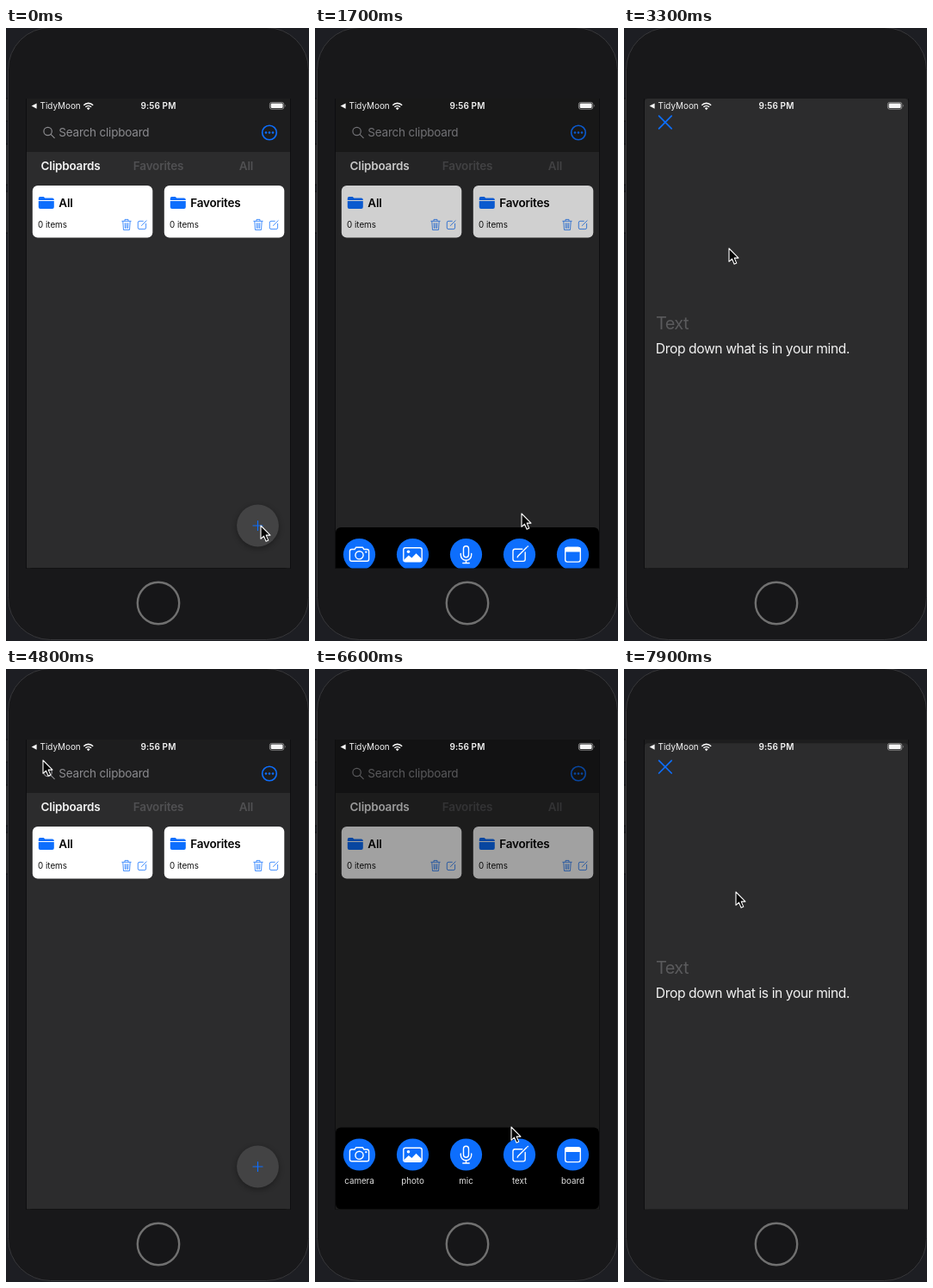
Write an HTML page that moves like this. It is 352 px wide and 712 px high and loops after 8 s.

```html
<!DOCTYPE html>
<html lang="en">
<head>
<meta charset="utf-8">
<title>Clipboard app</title>
<style>
  html, body { margin: 0; width: 100%; height: 100%; overflow: hidden; background: #1d1e23; }
  svg { display: block; width: 100%; height: 100%; }
  text { font-family: Inter, "Liberation Sans", sans-serif; font-size: 13.5px; letter-spacing: -.2px; }
  .mid { text-anchor: middle; }
  .semi { font-weight: 600; }
  .small { font-size: 9.8px; letter-spacing: -.03px; }
  .blue { stroke: #0d6efd; }
  .line { fill: none; stroke-linecap: round; stroke-linejoin: round; }
</style>
</head>
<body>
<svg viewBox="0 0 352 712">
  <defs>
    <clipPath id="screen"><rect x="24" y="82" width="306" height="545.5"/></clipPath>
    <filter id="soft" x="-50%" y="-50%" width="200%" height="200%"><feGaussianBlur stdDeviation="3"/></filter>

    <g id="card">
      <rect width="139.5" height="60.5" rx="6" fill="#fff"/>
      <path d="M7 17v-2.2q0-1.8 1.8-1.8h4l1.8 1.6h8.4q2 0 2 1.8V17z" fill="#0d6efd"/>
      <path d="M7 18h18v7q0 2-2 2H9q-2 0-2-2z" fill="#0d6efd"/>
      <g class="line blue" stroke-width=".95" opacity=".8">
        <path d="M104 41.3h10.4M107.2 41v-1.6h4V41M105 41.5l.7 10h7l.7-10M107.4 43.7l.2 5.8M109.2 43.7v5.8M111 43.7l-.2 5.8"/>
        <path d="M128.5 41.3h-4.3q-1.7 0-1.7 1.7v5.9q0 1.7 1.7 1.7h5.9q1.7 0 1.7-1.7v-4.6M126.6 46.5l5.8-5.8"/>
      </g>
      <text class="small" x="6.3" y="49" fill="#111">0 items</text>
    </g>

    <g id="camera">
      <path d="M-8.8-6h3.4l1.6-2.3h7.6L5.4-6h3.4q2.3 0 2.3 2.3v9.2q0 2.3-2.3 2.3H-8.8q-2.3 0-2.3-2.3v-9.2q0-2.3 2.3-2.3z"/>
      <circle cy=".8" r="4.6"/><circle cx="7.8" cy="-2.9" r=".5"/>
    </g>
    <g id="photo">
      <rect x="-10.7" y="-7.8" width="21.4" height="16" rx="2.3"/>
      <path d="M-10 6l5.3-5 3.6 3.1L4-1.2 10 4.8v1.5q0 1.4-1.6 1.4H-8.4Q-10 7.7-10 6z" fill="#fff" stroke="none"/>
      <circle cx="-5" cy="-3.2" r="1.8" fill="#fff" stroke="none"/>
    </g>
    <g id="mic">
      <rect x="-3" y="-9.8" width="6" height="13" rx="3"/>
      <path d="M-6.2-1v1.6a6.2 6.2 0 0 0 12.4 0V-1M0 7v3M-3.7 10h7.4"/>
    </g>
    <g id="text">
      <path d="M3.2-6.3h-8.4q-2.3 0-2.3 2.3v9.6q0 2.3 2.3 2.3h9.6q2.3 0 2.3-2.3v-8.2M-1.8 2.1L8.4-8.2M-1.8 2.1l-.5 1.2"/>
      <path d="M9.5-9.3l.3-.3"/>
    </g>
    <g id="board">
      <rect x="-8.8" y="-8" width="17.6" height="16.6" rx="2.6"/>
      <path d="M-8.6-3.7v-2Q-8.6-8-6.3-8H6.3q2.3 0 2.3 2.3v2z" fill="#fff"/>
    </g>
  </defs>

  <rect width="352" height="712" fill="#1d1e23"/>
  <g fill="#29292c" stroke="#09090a" stroke-width=".8">
    <rect x="-2" y="82" width="5" height="26"/>
    <rect x="-2" y="135" width="5" height="47"/>
    <rect x="-2" y="190" width="5" height="48"/>
  </g>
  <rect x="2.5" y="-.5" width="349" height="711" rx="49" fill="#18181a" stroke="#37373a"/>
  <rect x="23.5" y="82" width="307" height="546" fill="#050506"/>
  <circle cx="177" cy="668" r="24.2" fill="#161618" stroke="#707070" stroke-width="2.4"/>

  <g clip-path="url(#screen)">
    <rect x="24" y="82" width="306" height="546" fill="#2c2c2d"/>
    <rect x="24" y="82" width="306" height="62" fill="#1d1d1e"/>
    <g class="line" stroke="#8b8b8f" stroke-width="1.2">
      <circle cx="48.6" cy="120" r="4.7"/><path d="M52.2 123.6l4 4"/>
    </g>
    <text x="61.3" y="126.3" fill="#8b8b8f">Search clipboard</text>
    <circle class="line blue" cx="306" cy="121.5" r="8.3" stroke-width="1.6"/>
    <g fill="#0d6efd">
      <circle cx="302" cy="121.5" r="1.3"/><circle cx="306" cy="121.5" r="1.3"/><circle cx="310" cy="121.5" r="1.3"/>
    </g>
    <g class="mid semi" fill="#505052">
      <text x="75" y="165.3" fill="#f4f4f4">Clipboards</text>
      <text x="177" y="165.3">Favorites</text>
      <text x="279" y="165.3">All</text>
    </g>
    <use href="#card" x="30.8" y="183"/>
    <use href="#card" x="183.8" y="183"/>
    <g class="semi" fill="#050505">
      <text x="61.3" y="207.8">All</text>
      <text x="214.2" y="207.8">Favorites</text>
    </g>
    <g id="fab">
      <circle cx="292.5" cy="580" r="25" fill="#000" opacity=".3" filter="url(#soft)"/>
      <circle cx="292.5" cy="578" r="24.4" fill="#434344"/>
      <path id="plus" class="line blue" d="M287 578h11M292.5 572.5v11" stroke-width="1.2"/>
    </g>
    <rect id="scrim" x="24" y="82" width="306" height="546"/>
    <g id="sheet"><rect x="24" y="532.5" width="306" height="95" rx="6"/></g>
    <g id="modal">
      <rect x="24" y="82" width="306" height="545.5" rx="4" fill="#2c2c2d"/>
      <path id="close" class="line blue" d="M40.6 102.2l14.6 14.6M55.2 102.2l-14.6 14.6" stroke-width="1.7"/>
      <text x="37" y="350" fill="#5a5a5c" style="font-size:20px;letter-spacing:-.6px">Text</text>
      <text x="36.8" y="378" fill="#f2f2f2" style="font-size:15.7px;letter-spacing:-.43px">Drop down what is in your mind.</text>
    </g>
    <g fill="#f5f5f5">
      <path d="M29.6 90.6l6-3.1v6.2z"/>
      <text x="39.6" y="94.2" style="font-size:9.9px;letter-spacing:0">TidyMoon</text>
      <text class="mid semi" x="177" y="94.2" style="font-size:10px;letter-spacing:.1px">9:56 PM</text>
      <g class="line" stroke="#f5f5f5" stroke-width="1.6" style="stroke-linecap:butt">
        <path d="M90.3 89.7a7.4 7.4 0 0 1 10.8 0M92.4 91.8a4.7 4.7 0 0 1 6.6 0"/>
      </g>
      <path d="M95.7 95.2l-1.9-1.9a2.7 2.7 0 0 1 3.8 0z"/>
      <rect x="306.4" y="86.4" width="16.4" height="7.8" rx="2.2" fill="none" stroke="#a0a0a0" stroke-width=".8"/>
      <rect x="307.6" y="87.6" width="14" height="5.4" rx="1.2"/>
      <path d="M324 88.8q1.3 1.5 0 3z" fill="#a0a0a0"/>
    </g>
  </g>
  <path id="cursor" d="M0 0v15.3l3.5-3.2 2.6 6.1 2.7-1.1-2.6-6h4.8z" fill="#050505" stroke="#fff" stroke-width="1.1" stroke-linejoin="round"/>
</svg>
<script>
  const LOOP = 8000, STEP = 100;
  const SHEET_H = 95, SCREEN_H = 545.5, DIM = .37;
  const el = id => document.getElementById(id);
  const clamp = v => Math.min(1, Math.max(0, v));
  const ease = v => (v = clamp(v), v * v * (3 - 2 * v));
  const ramp = (t, from, length) => ease((t - from) / length);
  const within = (t, from, to) => t >= from && t < to;
  const shift = (node, x, y) => node.setAttribute('transform', `translate(${x.toFixed(2)} ${y.toFixed(2)})`);

  // Critically damped spring, 0 to 1
  const spring = (t, from) => {
    const s = Math.max(0, t - from) * .01826;
    return 1 - (1 + s) * Math.exp(-s);
  };

  ['camera', 'photo', 'mic', 'text', 'board'].forEach((name, i) => {
    const x = 51.5 + 62 * i;
    el('sheet').insertAdjacentHTML('beforeend',
      `<circle cx="${x}" cy="564" r="18.6" fill="#0d6efd"/>
       <use href="#${name}" x="${x}" y="564" class="line" stroke="#fff" stroke-width="1.4"/>
       <text class="small mid" x="${x}" y="598" fill="#dedede">${name}</text>`);
  });

  // Pointer path: time, x, y
  const path = [
    [0, 296, 578], [600, 295, 578], [800, 269, 578], [1100, 243, 574], [1400, 240, 574],
    [1700, 240, 564], [2400, 241, 565], [2700, 216, 565], [2950, 215, 564], [3300, 122, 256],
    [3700, 43, 106], [4900, 43, 106], [5450, 292, 577], [5950, 292, 577], [6600, 228, 532],
    [6750, 229, 511], [7000, 248, 572], [7550, 247, 571], [7900, 130, 259], [8000, 130, 259]
  ];
  const slope = (i, k) => path[i + 1] && path[i] ? (path[i + 1][k] - path[i][k]) / (path[i + 1][0] - path[i][0]) : 0;
  const tangent = (i, k) => {
    const a = slope(i - 1, k), b = slope(i, k);
    return a * b > 0 ? 2 * a * b / (a + b) : 0;
  };
  function pointer(t, k) {
    let i = 0;
    while (i < path.length - 2 && t >= path[i + 1][0]) i++;
    const [p, q] = [path[i], path[i + 1]];
    const d = q[0] - p[0], u = (t - p[0]) / d, w = 1 - u;
    return p[k] + (q[k] - p[k]) * ease(u) + d * u * w * (w * tangent(i, k) - u * tangent(i + 1, k));
  }

  function draw(t) {
    const open = ramp(t, 220, 380) - ramp(t, 1550, 300) + ramp(t, 5600, 380) - ramp(t, 7250, 300);
    el('scrim').setAttribute('opacity', DIM * open);
    shift(el('sheet'), 0, SHEET_H * (1 - open));

    const hidden = t < 3000 ? ramp(t, 220, 200) : t < 5000 ? 0 : ramp(t, 5600, 200);
    el('fab').setAttribute('opacity', 1 - hidden);
    el('plus').setAttribute('opacity', within(t, 100, 300) || within(t, 5500, 5700) ? .3 : 1);

    const shown = t < 4480 ? spring(t, 1820) : t < 7000 ? 1 - spring(t, 4480) : spring(t, 7520);
    el('modal').setAttribute('visibility', shown > .025 ? 'visible' : 'hidden');
    shift(el('modal'), 0, SCREEN_H * (1 - shown));
    el('close').setAttribute('opacity', within(t, 4300, 4400) ? .35 : 1);

    shift(el('cursor'), pointer(t, 1), pointer(t, 2));
  }

  const start = performance.now();
  function tick() {
    const t = (performance.now() - start) % LOOP;
    draw(Math.floor(t / STEP) * STEP);
    requestAnimationFrame(tick);
  }
  tick();
</script>
</body>
</html>
```
